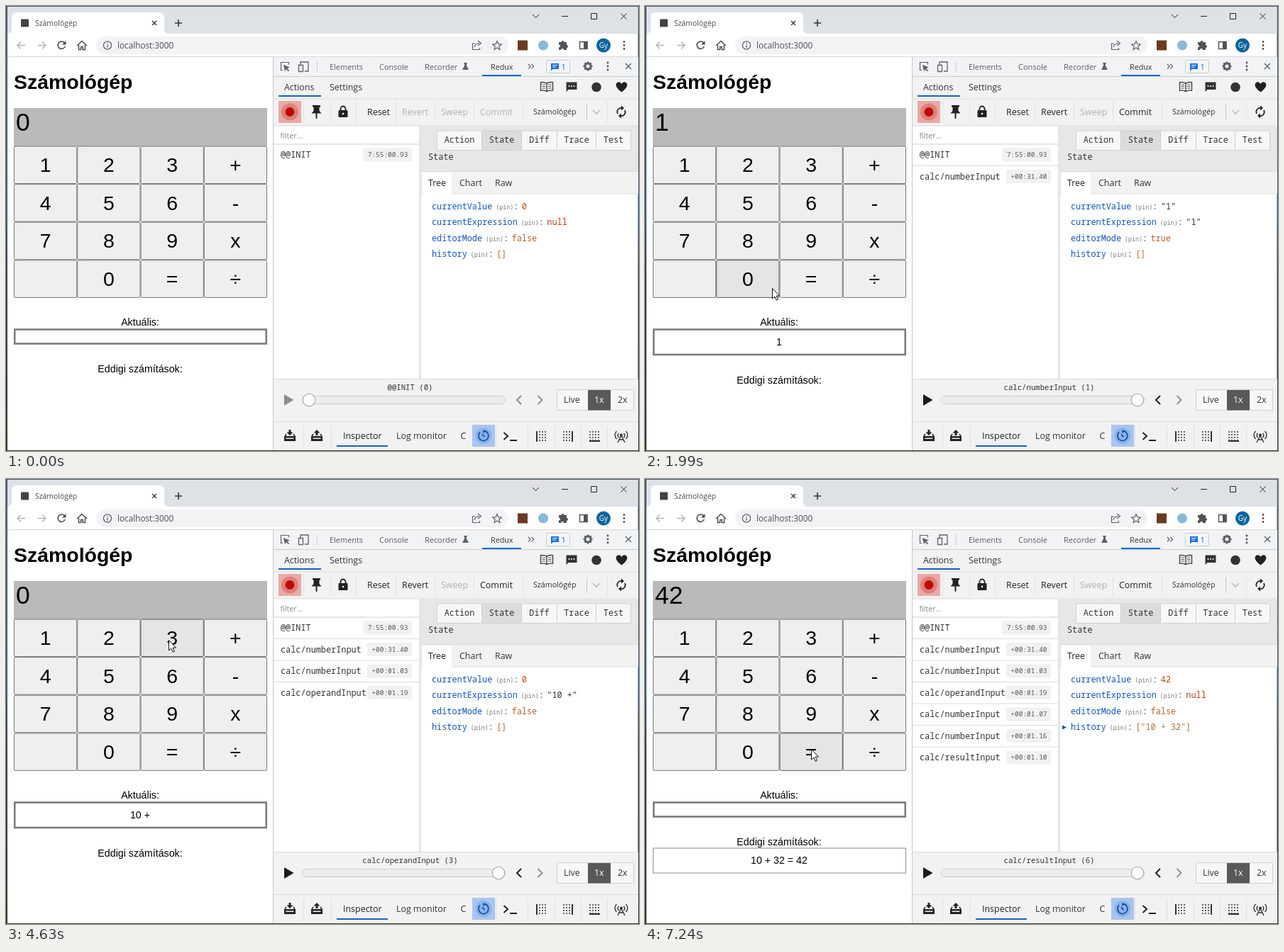
An HTML page that plays this animation: 892 px wide and 628 px high, repeating every 8000 ms.

```html
<!DOCTYPE html>
<html lang="hu">
<head>
<meta charset="utf-8">
<title>Számológép</title>
<style>
html, body { margin: 0; width: 100%; height: 100%; overflow: hidden; background: #fff; }
svg { display: block; width: 892px; height: 628px; }
text { white-space: pre; }
.ui { font-family: "Open Sans", sans-serif; }
.mono { font-family: "Noto Sans Mono", monospace; }
.page { font-family: "Liberation Sans", Arial, sans-serif; }
</style>
</head>
<body>
<svg id="stage" viewBox="0 0 892 628">
  <defs>
    <linearGradient id="desk" x2="0" y2="1">
      <stop offset="0" stop-color="#4b5b66"/>
      <stop offset=".46" stop-color="#3d5c80"/>
      <stop offset=".6" stop-color="#39424a"/>
      <stop offset="1" stop-color="#3b3428"/>
    </linearGradient>
  </defs>
  <rect width="892" height="628" fill="url(#desk)"/>
  <g id="frame"></g>
  <g id="fixed"></g>
  <g id="live"></g>
</svg>
<script>
const LOOP = 8000, FIRST = 376, STEP = 201.47;
const INK = '#333', PALE = '#b0b0b0', BLUE = '#1967d2', BAR = '#f2f2f2', LINE = '#d0d0d0';
const $ = id => document.getElementById(id);

const rect = (x, y, w, h, fill, stroke = 'none', rx = 0, sw = 1) =>
  `<rect x="${x}" y="${y}" width="${w}" height="${h}" rx="${rx}" fill="${fill}" stroke="${stroke}" stroke-width="${sw}"/>`;
const circle = (x, y, r, fill, stroke = 'none', sw = 1) =>
  `<circle cx="${x}" cy="${y}" r="${r}" fill="${fill}" stroke="${stroke}" stroke-width="${sw}"/>`;
const path = (d, stroke = INK, sw = 1.4, fill = 'none') =>
  `<path d="${d}" fill="${fill}" stroke="${stroke}" stroke-width="${sw}"/>`;
const solid = (d, fill = INK) => path(d, 'none', 0, fill);
const text = (cls, x, y, size, s, fill = INK, anchor = 'start', weight = 400) =>
  `<text class="${cls}" x="${x}" y="${y}" font-size="${size}" fill="${fill}" text-anchor="${anchor}" font-weight="${weight}">${s}</text>`;
const ui = (x, y, s, fill, size = 12.44) => text('ui', x, y, size, s, fill);
const mono = (x, y, s, fill, size = 11.85, anchor) => text('mono', x, y, size, s, fill, anchor);
const page = (x, y, s, size = 14.22, anchor = 'middle', weight) =>
  text('page', x, y, size, s, '#000', anchor, weight);
const dots = (x, y) => [-5, 0, 5].map(d => circle(x, y + d, 1.4, '#50545a')).join('');
const vline = (x, y, h, c = LINE) => rect(x, y, 1, h, c);
const hline = (x, y, w, c = LINE) => rect(x, y, w, 1, c);

function frame(focused) {
  const c = focused ? '#222' : '#909396';
  return rect(2, 1, 888.5, 626, '#fff') + rect(2, 1, 888.5, 38, focused ? '#dee1e6' : '#e7eaed') +
    path('M742 12l4.500 4.500 4.500-4.500M783 14.500h9M824.500 10.500h8v8h-8zM866.500 10.500l8 8m0-8l-8 8', c, 1);
}

function browser() {
  return solid('M2 39q6 0 6-7V16q0-7 7-7h201q7 0 7 7v16q0 7 6 7z', '#fff') +
    rect(21, 18.500, 11, 11, '#474242', 'none', 1) +
    ui(41, 28, 'Számológép', '#45494d', 10.4) +
    path('M206 21l6 6m0-6l-6 6', '#3c4043', 1.5) + path('M238 24h10m-5-5v10', '#333', 1.6) +
    rect(127, 43, 581, 25, '#f1f3f4', 'none', 12.5) +
    path('M27 55.500H16m5-5l-5 5 5 5M45 55.500h11m-5-5l5 5-5 5', '#b2b4b7', 1.4) +
    path('M82.500 52a5.200 5.200 0 1 0 .8 5', '#4a4d51', 1.6) + solid('M84.500 49v5.500H79z', '#4a4d51') +
    path('M100 56l7-6.500 7 6.500M102.500 55v6.500h3.200V57.500h2.600v4h3.200V55', '#4a4d51', 1.5) +
    circle(143, 55.500, 5.6, 'none', '#5f6368', 1.3) + rect(142.400, 54.700, 1.3, 4, '#5f6368') + rect(142.400, 52, 1.3, 1.4, '#5f6368') +
    ui(157, 60, 'localhost:3000', '#4b4f53', 11.75) +
    path('M661 53h-3.500v8.500h10V59M660 58q1-5 7-5.500M665 49l4.500 3.500-4.500 3.500', '#5f6368', 1.2) +
    path('M692 49.500l1.800 4.200 4.400.4-3.400 2.900 1.100 4.400-3.900-2.400-3.900 2.400 1.100-4.400-3.400-2.900 4.400-.4z', '#5f6368', 1.2) +
    rect(721, 48.500, 14, 14, '#6b3a22') + circle(757, 55.500, 7, '#8ab9d8') +
    solid('M779 51h3.500a2 2 0 0 1 4 0h3.500v4a2 2 0 0 1 0 4v3h-4a2 2 0 0 0-4 0h-3v-3.500a2 2 0 0 0 0-4z', '#505458') +
    path('M808.500 50.500h10.500v10H808.500z', '#505458', 1.5) + rect(814, 50, 5.500, 11, '#505458') +
    circle(842, 55.500, 10, '#08649c') + text('ui', 842, 59, 10, 'Gy', '#fff', 'middle') +
    dots(871, 55.500) + hline(2, 71, 888, '#d5d8db');
}

function calculator() {
  return page(11, 117, 'Számológép', 28.44, 'start', 700) + rect(11, 144, 357, 54, '#bbb9ba') +
    page(189, 451, 'Aktuális:');
}

function tabs() {
  const c = '#5f6368';
  return rect(377, 72, 514, 28, '#f1f3f4') + vline(376, 72, 555, '#c4c7ca') +
    path('M390 90.500h-2.500v-11h11v3M387.500 79.500', c, 1.2) + solid('M391 83l9 3.500-3.800 1.500 3 3-1.300 1.200-3-3L393 92z', c) +
    path('M415 84v-5h11v13h-5M412.500 83.500h6v9h-6z', c, 1.3) + vline(438, 78, 16) +
    ui(456, 90, 'Elements', '#5a5e62', 10.95) + ui(526, 90, 'Console', '#5a5e62', 10.95) +
    ui(590, 90, 'Recorder', '#5a5e62', 10.95) + ui(683, 90, 'Redux', '#333', 10.75) +
    solid('M645 80h5v1.200h-1v3l3 5.800h-9l3-5.800v-3h-1z', c) +
    path('M736 82l3 3.300-3 3.300M740.500 82l3 3.300-3 3.300', c, 1.2) +
    rect(761.500, 76.500, 33, 18, '#f4f6f8', '#c8ccd0', 2) + solid('M768 81h11v8h-8l-3 2.500z', '#1a6be0') +
    path('M770 83.500h7m-7 2.500h5', '#fff', 1) + ui(782.500, 90, '1', BLUE, 11) +
    circle(820, 85, 4, 'none', c, 3) +
    [0, 45, 90, 135].map(a => `<g transform="rotate(${a} 820 85)">${path('M820 78.500v3m0 7v3', c, 2.6)}</g>`).join('') +
    dots(848, 85) + path('M873 81l8 8m0-8l-8 8', c, 1.4) +
    hline(377, 99, 514, '#cacdd1') + rect(671, 97, 55, 2, BLUE);
}

function header() {
  return rect(377, 100, 514, 69, BAR) + ui(392, 119, 'Actions') + ui(456, 119, 'Settings') +
    hline(377, 130.500, 514, '#dedede') + rect(384, 126, 60, 2, '#1662c4') +
    path('M762 109q-4-2-8.500-1.300v11.600q4.500-.7 8.500 1.200 4-1.900 8.500-1.200v-11.600q-4.500-.7-8.500 1.300zv11', '#444', 1.4) +
    path('M755.500 111h4.500m-4.500 2.500h4.500m-4.500 2.500h4.500m4-5h4.500m-4.500 2.500h4.500m-4.500 2.500h4.500', '#555', .9) +
    solid('M789.500 107.500h15v10.500h-12l-3 3z') + [793.500, 797, 800.500].map(x => circle(x, 113, 1, '#fff')).join('') +
    circle(832, 114.500, 6.800, INK) +
    solid('M867.500 121.500c-9-6.500-9-11-6.500-13.300 2-1.500 5-1 6.500 1.800 1.500-2.800 4.500-3.300 6.500-1.800 2.500 2.300 2.500 6.800-6.500 13.300z', '#222') +
    rect(384, 134, 32, 31, '#e9aaa5') + circle(400, 149.500, 12, '#de817b') + circle(400, 149.500, 6.500, '#bf0a05') +
    solid('M432 140h11v2.500h-1.500v5.500l3 3.500h-6v6.500l-1 1.500-1-1.500v-6.500h-6l3-3.500v-5.500H432z', '#222') +
    path('M471.500 147.500v-2.500a3.500 3.500 0 0 1 7 0v2.500', '#222', 1.8) + rect(468.500, 147, 13, 10, '#222', 'none', 1) + circle(475, 152, 1.300, '#fff') +
    [419, 457, 493, 549, 604, 659, 728, 847].map(x => vline(x, 134, 31, '#e2e2e2')).join('') +
    ui(743, 153, 'Számológép', INK, 10.67) + vline(818, 139, 21, '#c8c8c8') + path('M827 147l5 5 5-5', '#bbb', 1.6) +
    path('M862 152a5.500 5.500 0 0 1 6-8M872 147a5.500 5.500 0 0 1-6 8', '#222', 1.7) +
    solid('M867 140.500l4 3.500-4 3.500zM867 151.500l-4 3.500 4 3.500z', '#222');
}

function panels() {
  const segs = [['Action', 607, 63], ['State', 670, 56], ['Diff', 726, 50], ['Trace', 776, 55], ['Test', 831, 49]];
  return ui(386.500, 187, 'filter...', '#858585', 10.67) + hline(377, 168.500, 514, '#dadada') + hline(377, 194.500, 205) +
    rect(582, 169, 3, 358, '#dcdcdc') + vline(583, 169, 358, '#f3f3f3') +
    rect(585, 169, 306, 65, '#e7e7e7') + rect(585, 234, 306, 31, BAR) +
    segs.map(([s, x, w]) => rect(x + .5, 176, w, 27.500, s == 'State' ? '#dcdcdc' : '#f7f7f7', '#d0d0d0', 1) +
      mono(x + w / 2 + .5, 193, s, INK, 11.85, 'middle')).join('') +
    mono(595, 217, 'State') + hline(585, 233, 306, '#dadada') + hline(585, 264.500, 306, '#e0e0e0') +
    rect(587, 235, 41, 31, '#fff') + ui(595, 254, 'Tree', '#222') + ui(639, 254, 'Chart') + ui(689, 254, 'Raw') +
    rect(377, 527, 514, 100, BAR) + hline(377, 526, 514, '#dadada') + hline(377, 586, 514, '#dadada') +
    path('M749.500 550l6 6-6 6', '#8f9093', 2) +
    rect(776.500, 541.500, 108, 29, '#f7f7f7', LINE, 1) + rect(820, 542, 32, 28.500, '#59595b') +
    ui(786, 560, 'Live') + ui(829, 560, '1x', '#fff') + ui(862, 560, '2x');
}

function footer() {
  const tray = x => path(`M${x - 7} 607l2-3m10 0l2 3`, '#222', 1.5) + solid(`M${x - 8} 607h16v7h-16z`, '#222') + rect(x - 5.500, 609.500, 11, 1.500, '#f2f2f2');
  const rows = [601, 605, 609, 613];
  const dotted = (x, vert) => rows.map(y => path(`M${x - 7} ${y}h14`, INK, 1.4).replace('/>', ` stroke-dasharray="${vert ? 14 : 2}" />`)).join('');
  return tray(400) + solid('M398.500 598h3v3.500h3l-4.500 4.500-4.500-4.500h3z', '#222') +
    tray(438) + solid('M436.500 606h3v-3.500h3l-4.500-4.500-4.500 4.500h3z', '#222') +
    [419, 458, 690, 735, 773, 810, 847].map(x => vline(x, 592, 30, '#e0e0e0')).join('') +
    ui(475, 611, 'Inspector', '#222') + rect(466, 620, 72, 2, '#1662c4') + ui(550, 611, 'Log monitor') + ui(640.500, 611, 'C') +
    rect(657, 591, 32, 31, '#a9c5ef') + circle(673, 606.500, 11.500, '#8bb2ec') +
    path('M668 601.500a7 7 0 1 0 5-2v3M671 604.500l3.500 3.500', '#17549f', 1.8) +
    path('M701.500 602l5.500 5-5.500 5', '#222', 2) + rect(710, 612, 10, 2, '#222') +
    dotted(754) + rect(747, 600, 2, 15, INK) + dotted(792) + rect(797, 600, 2, 15, INK) +
    dotted(829) + rect(822, 613, 15, 2, INK) +
    path('M867 606l-5 10m5-10l5 10m-8-4h6M863.500 609a4.500 4.500 0 0 1 0-6m7 0a4.500 4.500 0 0 1 0 6M860.500 611a7.500 7.500 0 0 1 0-11m13 0a7.500 7.500 0 0 1 0 11', '#333', 1.4) +
    circle(867, 605.500, 2, '#333');
}

// Actions: step, type, time label, display, expression, is typing, history
const log = [
  [-1, '@@INIT', '7:55:00.93', '0', null, false],
  [6, 'calc/numberInput', '+00:31.40', '1', '1', true],
  [12, 'calc/numberInput', '+00:01.03', '10', '10', true],
  [18, 'calc/operandInput', '+00:01.19', '0', '10 +', false],
  [23, 'calc/numberInput', '+00:01.07', '3', '10 + 3', true],
  [28, 'calc/numberInput', '+00:01.16', '32', '10 + 32', true],
  [34, 'calc/resultInput', '+00:01.10', '42', null, false, '10 + 32']
];

// Pointer way points: step, x, y
const way = [
  [1, 420, 330], [2, 150, 232], [3, 98, 246], [4, 58, 236], [6, 55, 234], [8, 179, 398], [9, 150, 392],
  [12, 146, 390], [16, 331, 232], [18, 329, 231], [21, 229, 227], [23, 229, 229], [26, 142, 227], [28, 142, 227],
  [33, 234, 381], [40, 234, 381]
];
function pointer(k) {
  const i = way.findIndex(p => p[0] > k);
  if (i < 1) return null;
  const [a, x, y] = way[i - 1], [b, u, v] = way[i], f = (k - a) / (b - a);
  return [x + (u - x) * f, y + (v - y) * f];
}

const keys = ['1', '2', '3', '+', '4', '5', '6', '-', '7', '8', '9', 'x', '', '0', '=', '÷'];
const KW = 89.25, KH = 53.6;
function keypad(hot) {
  return keys.map((s, i) => {
    const x = 11 + i % 4 * KW, y = 197.500 + (i >> 2) * KH;
    const over = hot && hot[0] >= x && hot[0] < x + KW && hot[1] >= y && hot[1] < y + KH;
    return rect(x + .5, y + .5, KW - 1, KH - 1, over ? '#e5e5e5' : '#efefef', over ? '#555' : '#767676', 1.5) +
      page(x + KW / 2, y + 36.500, s, 28.44);
  }).join('');
}

function treeRow(i, key, value, color) {
  const y = 287 + i * 22.3, end = 600 + key.length * 7.11;
  return mono(600, y, key, '#1257b8') + mono(end + 5, y, '(pin)', '#777', 8.3) +
    mono(end + 30, y, ':', '#1257b8') + mono(end + 41.500, y, value, color);
}

function actionRow([, type, time], i) {
  const y = 210 + i * 30.5, w = time.length * 5.69 + 12;
  return (i ? hline(377, y - 15.500, 205, '#dcdcdc') : '') + mono(387, y + 4, type) +
    rect(572 - w, y - 9.500, w, 19, '#f1f1f1', 'none', 2) + mono(566.500, y + 3, time, '#555', 9.48, 'end');
}

function live(k) {
  const done = log.filter(a => a[0] <= k), n = done.length - 1;
  const [, type, , value, expr, typing, past] = done[n];
  const on = n > 0, orange = '#c2500f', quote = s => `"${s}"`;
  let s = page(14, 176, value, 35.56, 'start') + keypad(pointer(k - .15));
  s += rect(12.250, 456.500, 354.500, expr ? 35.500 : 20, '#fff', '#7d7b7d', 0, 2.6);
  if (expr) s += page(189, 479, expr);
  s += page(189, expr ? 533 : 517, 'Eddigi számítások:');
  if (past) s += rect(11.500, 521, 356, 35, '#fff', '#8a8a8a') + page(189, 543, past + ' = ' + value);
  s += done.map(actionRow).join('');
  s += ui(509, 154, 'Reset', '#222') + ui(558, 154, 'Revert', on ? '#222' : PALE) +
    ui(613, 154, 'Sweep', PALE) + ui(668, 154, 'Commit', on ? '#222' : PALE);
  s += treeRow(0, 'currentValue', typing ? quote(value) : value, typing ? INK : orange) +
    treeRow(1, 'currentExpression', expr ? quote(expr) : 'null', expr ? INK : '#b8401c') +
    treeRow(2, 'editorMode', String(typing), '#b8622a') +
    treeRow(3, 'history', past ? `[${quote(past)}]` : '[]', '#b5713a');
  if (past) s += solid('M588 347.500l6 3-6 3z', '#1257b8');
  s += mono(569.500, 542, `${type} (${n})`, INK, 10.67, 'middle') +
    solid('M392 548l13.500 8-13.500 8z', on ? '#1a1a1a' : '#8a8d96') +
    rect(417.500, 550.500, 286, 11, '#ededed', '#cfcfcf', 5.5) +
    circle(on ? 694 : 427, 556, 8.800, '#fff', '#a5a5a5', 1.1) +
    path('M726 550l-6 6 6 6', on ? '#222' : '#8f9093', 2);
  const p = k >= 1 && pointer(k);
  if (p) s += `<g transform="translate(${p[0]} ${p[1]})">${path('M.5.500v14.500l3.300-3 2.300 5.300 2.300-1-2.300-5.200h4.400z', '#111', 1, '#fff')}</g>`;
  return s;
}

$('fixed').innerHTML = browser() + calculator() + tabs() + header() + panels() + footer();
let shown = null;
function draw(t) {
  const k = Math.max(-1, Math.floor((t - FIRST) / STEP));
  if (k !== shown) {
    shown = k;
    $('frame').innerHTML = frame(k < 0 || k >= 6);
    $('live').innerHTML = live(k);
  }
}
const start = performance.now();
function tick() {
  draw((performance.now() - start) % LOOP);
  requestAnimationFrame(tick);
}
tick();
</script>
</body>
</html>
```
